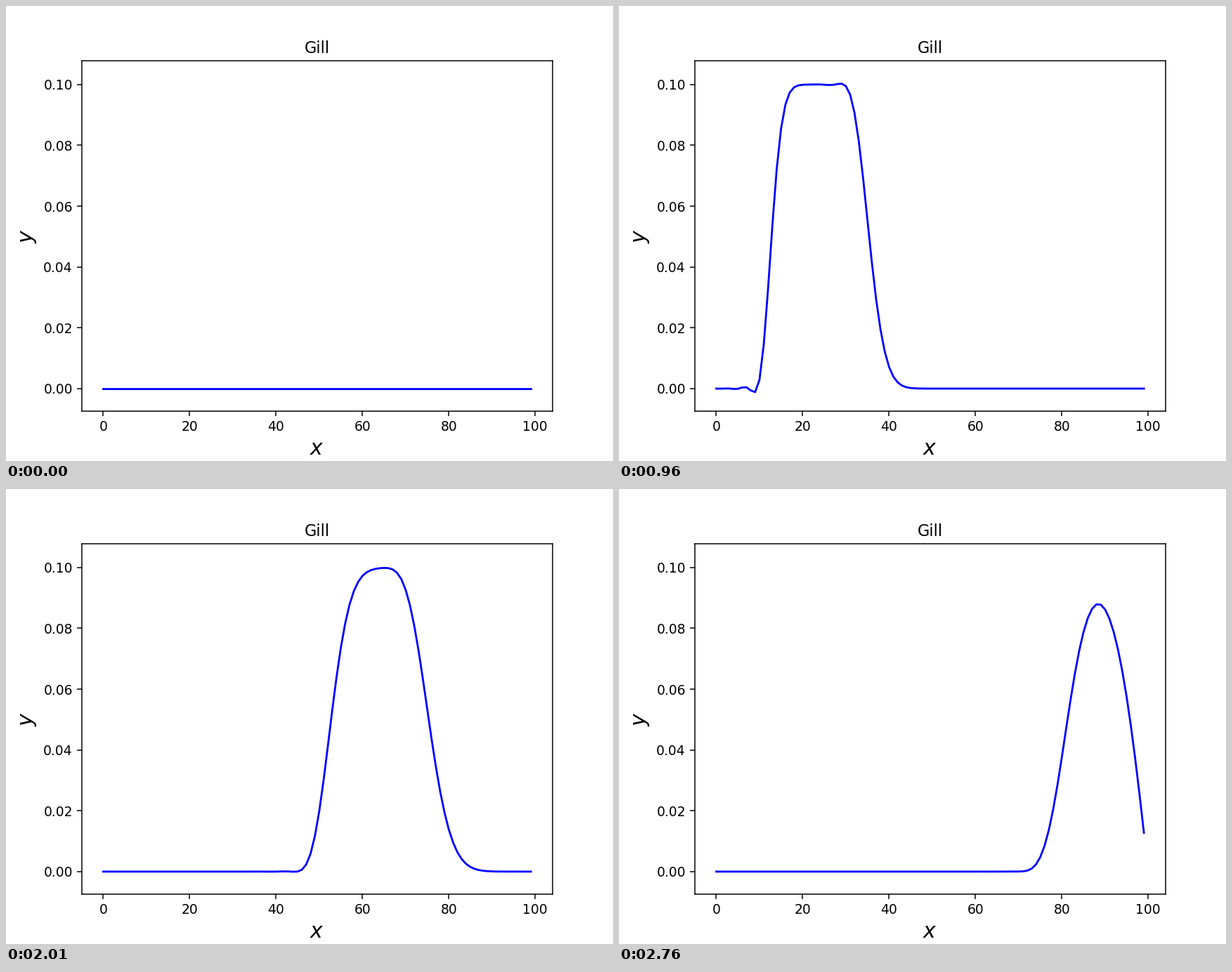
Write a matplotlib script that moves like this. It is 864 px wide and 648 px high and loops after 2.79 s.

```python
import numpy as np
import matplotlib.pyplot as plt
from matplotlib.animation import FuncAnimation

FRAMES, INTERVAL = 93, 30
CELLS = 100
STIFFNESS, DAMPING = 1.304, 0.231
HEIGHT = 0.1


def drive(step):
    """Height of the left end during a step: a pulse of about 20 steps."""
    edges = {0: 0, 1: 0.40, 2: 0.87, 21: 0.43, 22: 0.10}
    return HEIGHT * edges.get(step, 1.0 if step < 21 else 0.0)


def rate(state):
    """Damped wave equation with both ends held."""
    u, v = state
    force = STIFFNESS * u + DAMPING * v
    out = np.zeros_like(state)
    out[0, 1:-1] = v[1:-1]
    out[1, 1:-1] = force[2:] - 2 * force[1:-1] + force[:-2]
    return out


def gill_step(y):
    r = np.sqrt(0.5)
    k1 = rate(y)
    k2 = rate(y + k1 / 2)
    k3 = rate(y + (r - 0.5) * k1 + (1 - r) * k2)
    k4 = rate(y - r * k2 + (1 + r) * k3)
    return y + (k1 + 2 * (1 - r) * k2 + 2 * (1 + r) * k3 + k4) / 6


def solve():
    state = np.zeros((2, CELLS + 1))
    history = [state[0, :CELLS].copy()]
    for step in range(1, FRAMES):
        state[0, 0] = drive(step)
        state = gill_step(state)
        history.append(state[0, :CELLS].copy())
    return history


waves = solve()

fig, ax = plt.subplots(figsize=(6.4, 4.8), dpi=135)
line, = ax.plot(np.arange(CELLS), waves[0], color="blue", lw=1.5)
ax.set_xlim(-4.95, 103.95)
ax.set_ylim(-0.00735, 0.10787)
ax.set_title("Gill")
ax.set_xlabel("$x$", fontsize=16)
ax.set_ylabel("$y$", fontsize=16)


def update(i):
    line.set_ydata(waves[i])
    return line,


anim = FuncAnimation(fig, update, frames=FRAMES, interval=INTERVAL,
                     repeat=True, repeat_delay=0)
plt.show()
```
